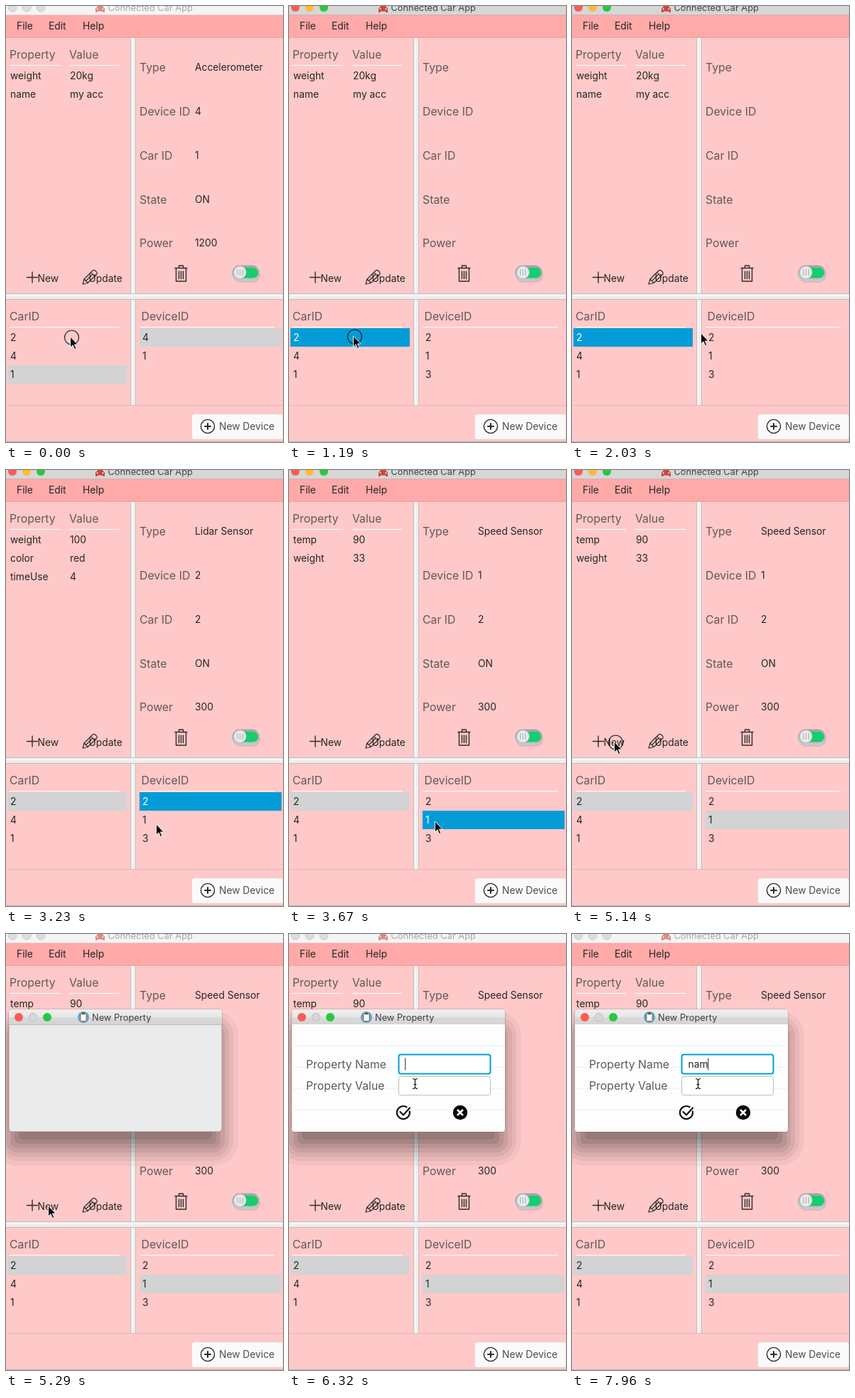
Animation, 390 px wide and 613 px high, one loop 8000 ms. Source, as an HTML page:

```html
<!DOCTYPE html>
<html lang="en">
<head>
<meta charset="utf-8">
<title>Connected Car App</title>
<style>
html, body { margin: 0; width: 100%; height: 100%; overflow: hidden; background: #ffc9c9; }
svg { display: block; }
text { font: 13.8px Inter, Roboto, sans-serif; fill: #262424; white-space: pre; }
.label { font-size: 15.8px; fill: #625858; }
.title { font-size: 12.8px; }
.icon { fill: none; stroke: #302b2b; stroke-width: 1.4; stroke-linejoin: round; stroke-linecap: round; }
</style>
</head>
<body>
<svg id="stage" width="390" height="613" viewBox="0 0 390 613">
  <defs>
    <linearGradient id="chrome" x2="0" y2="1">
      <stop offset="0" stop-color="#efefef"/><stop offset=".5" stop-color="#e6e6e6"/>
      <stop offset=".5" stop-color="#dadada"/><stop offset="1" stop-color="#d4d4d4"/>
    </linearGradient>
    <linearGradient id="pill" x2="0" y2="1">
      <stop offset="0" stop-color="#9da3a7"/><stop offset="1" stop-color="#c9cacd"/>
    </linearGradient>
  </defs>
  <g id="bar"></g>
  <path fill="#ffa9a9" d="M0 13H390V44H0z"/>
  <path stroke="#e0a8a8" d="M0 44.5H390"/>
  <text x="15" y="33">File</text><text x="60" y="33">Edit</text><text x="108" y="33">Help</text>

  <!-- split panes -->
  <path fill="#eeeeee" d="M176 45h7V561h-7zM0 404H390v9H0z"/>
  <path stroke="#c8bcbc" fill="none" d="M175.5 45V404M182.5 45V404M175.5 413V561M182.5 413V561M0 404.5H390M0 412.5H390"/>
  <path stroke="#fff" fill="none" d="M178 45V404M178 413V561M0 407H390M5 83.5H76M89 83.5H160M5 451.5H160M188 451.5H378"/>
  <path stroke="#e8b4b4" d="M0 561.5H390"/>
  <path stroke="#c9b3b3" d="M0 612.5H390"/>
  <text class="label" x="5" y="74">Property</text><text class="label" x="89" y="74">Value</text>
  <text class="label" x="5" y="442">CarID</text><text class="label" x="190.500" y="442">DeviceID</text>
  <text class="label" x="188" y="92">Type</text><text class="label" x="188" y="154">Device ID</text>
  <text class="label" x="188" y="216">Car ID</text><text class="label" x="188" y="278">State</text>
  <text class="label" x="188" y="339">Power</text>

  <!-- buttons -->
  <path class="icon" d="M29.500 381.500H44.500M37 374V389"/>
  <text x="44.500" y="388">New</text>
  <path class="icon" style="stroke-width:1.200" d="M108 391l2-7 12-12q2-1.500 4 .5l1.500 1.500q1.500 2 0 3.500l-12.500 12zM110 384l5 5M119.500 374.500l5.500 5.500M112.500 386.500l9.500-9.500"/>
  <text x="116.500" y="388">Update</text>
  <path class="icon" d="M238 368.500H255M243.500 368V365H249.500V368M239.500 369V387H253.500V369M243.500 373V383.500M246.500 373V383.500M249.500 373V383.500"/>
  <rect x="319" y="367" width="39" height="22" rx="11" fill="#000" opacity=".1"/>
  <rect x="318" y="364.500" width="39" height="22.500" rx="11.250" fill="url(#pill)"/>
  <rect x="322" y="368" width="33" height="14.500" rx="7.250" fill="#16cc6c"/>
  <circle cx="329.500" cy="374.500" r="8.700" fill="#e9eaec" stroke="#c0c3c6" stroke-width=".7"/>
  <path stroke="#b2b5ba" stroke-width="1.200" d="M326 370V379M329.500 370V379M333 370V379"/>
  <rect x="262" y="574" width="127.500" height="35" rx="3" fill="#fafafa"/>
  <circle class="icon" cx="284" cy="591" r="9.600"/>
  <path class="icon" style="stroke-width:2" d="M280 591H288M284 587V595"/>
  <text x="300" y="596" style="fill:#504b4b">New Device</text>

  <g id="data"></g>
  <g id="dialog"></g>
  <g id="pointer"></g>
</svg>
<script>
const $ = id => document.getElementById(id);
const LOOP = 8000, BLUE = '#039cd7', GREY = '#d3d3d3';

// Held pointer positions: time, x, y
const path = [
  [0, 90, 465], [440, 90, 464], [1630, 101, 463], [1770, 136, 461], [1910, 181, 460],
  [2050, 208, 463], [2190, 211, 464], [3230, 211, 498], [3380, 211, 497], [3670, 205, 494],
  [3820, 185, 483], [3970, 152, 455], [4110, 126, 415], [4260, 113, 391], [4400, 104, 388],
  [4550, 85, 385], [4700, 66, 383], [4840, 59, 382], [5730, 95, 330], [5870, 150, 250], [6020, 177, 210]
];
const clicks = [[0, 150], [1190, 1330], [2190, 2330], [3380, 3520], [5140, 5290]];

// What the panes show from each time on
const views = [
  { at: 0, car: 2, carFill: GREY, devices: [4, 1], dev: 0, devFill: GREY,
    props: [['weight', '20kg'], ['name', 'my acc']], detail: ['Accelerometer', 4, 1, 'ON', 1200] },
  { at: 1190, car: 0, carFill: BLUE, devices: [2, 1, 3], dev: -1, detail: [] },
  { at: 2190, carFill: GREY, dev: 0, devFill: BLUE,
    props: [['weight', 100], ['color', 'red'], ['timeUse', 4]], detail: ['Lidar Sensor', 2, 2, 'ON', 300] },
  { at: 3380, dev: 1, props: [['temp', 90], ['weight', 33]], detail: ['Speed Sensor', 1, 2, 'ON', 300] },
  { at: 5140, devFill: GREY }
];

const during = (t, [from, to]) => t >= from && t < to;
const text = (x, y, s, cls = '', fill = '') =>
  `<text x="${x}" y="${y}" class="${cls}"${fill && ` style="fill:${fill}"`}>${s}</text>`;
const dot = (x, y, r, fill, stroke = 'none') =>
  `<circle cx="${x}" cy="${y}" r="${r}" fill="${fill}" stroke="${stroke}"/>`;
const box = (x, y, w, h, fill, extra = '') =>
  `<rect x="${x}" y="${y}" width="${w}" height="${h}" fill="${fill}" ${extra}/>`;

function titleBar(active) {
  const lights = active ? ['#fc5b57', '#fdbc2e', '#28c83f'] : Array(3).fill('#dcdcdc');
  return box(0, 0, 390, 12, active ? '#d6d6d6' : '#f5f5f5') +
    box(0, 12, 390, 1, active ? '#cdb4b4' : '#e6cfcf') +
    lights.map((c, i) => dot(9 + 20 * i, 2, 6, c, active ? 'none' : '#c8c8c8')).join('') +
    `<g opacity="${active ? 1 : .6}"><path fill="#c9473c" d="M126 9V3l2-1 1.500-4h6l1.500 4 2 1v6h-2.500V7.500h-8V9z"/>
     <path fill="#fff" d="M127.500 3.500h2v1.500h-2zM135.500 3.500h2v1.500h-2z"/></g>` +
    text(143.5, 7, 'Connected Car App', 'title', active ? '#464646' : '#a8a8a8');
}

function list(x, w, items, chosen, fill) {
  return items.map((s, i) => {
    const on = i === chosen;
    return (on ? box(x, 453 + 26 * i, w, 26, fill) : '') +
      text(x + 4, 471 + 26 * i, s, '', on && fill === BLUE ? '#fff' : '');
  }).join('');
}

function panes(v) {
  return list(2, 168, [2, 4, 1], v.car, v.carFill) +
    list(188, 200, v.devices, v.dev, v.devFill) +
    v.props.map(([k, s], i) => text(6, 103 + 26 * i, k) + text(90, 103 + 26 * i, s)).join('') +
    v.detail.map((s, i) => text(266, Math.round(91 + 61.85 * i), s)).join('');
}

function form(t) {
  const typed = 'nam'.slice(0, [7210, 7360, 7960].filter(k => t >= k).length);
  const caret = 163.8 + [0, 8.3, 15.9, 28][typed.length];
  const caretOn = t < 5870 || during(t, [6320, 6910]) || t >= 7210;
  return box(4, 127, 300, 147, '#fdfdfd') + box(4, 260, 300, 18, '#fdfdfd', 'rx="4"') +
    '<path stroke="#e6f2f9" d="M4 157.500H304M4 187.500H304M4 217.500H304M4 247.500H304"/>' +
    text(24, 189, 'Property Name', 'label') + text(24, 219, 'Property Value', 'label') +
    box(154.5, 169.5, 129, 27, '#fff', 'rx="3" stroke="#049fd4" stroke-width="2"') +
    box(154.5, 200.5, 129, 26, '#fff', 'rx="3" stroke="#bcbcbc"') +
    text(163.5, 188, typed) +
    (caretOn ? `<path stroke="#222" d="M${caret} 174.500V191.500"/>` : '') +
    `<path class="icon" style="stroke:#111;stroke-width:2.200"
      d="M165.500 243.300A9 9 0 1 0 169.800 249.500M156.500 250l4.500 4.500 9-10"/>` +
    dot(241, 251, 10.2, '#0a0a0a') +
    '<path stroke="#fff" stroke-width="2.600" d="M237 247l8 8M245 247l-8 8"/>';
}

function dialog(t) {
  if (t < 5290) return '';
  const shadow = [23, 16, 10, 4, -2, -8, -14].map((e, i) =>
    box(4 - e, 131 - e, 300 + 2 * e, 172 + 2 * e, '#000',
      `rx="${Math.max(6, 12 + e)}" opacity="${.045 + .009 * i}"`)).join('');
  return shadow +
    box(4, 106, 300, 172, '#ebebeb', 'rx="4" stroke="#8d7c7c" stroke-width=".7"') +
    '<path fill="url(#chrome)" d="M4 127V110q0-4 4-4H300q4 0 4 4V127z"/><path stroke="#bdbdbd" d="M4 127.500H304"/>' +
    dot(18, 117, 6, '#fc5b57') + dot(38, 117, 5.7, '#d6d6d6', '#c2c2c2') + dot(58, 117, 6, '#28c83f') +
    dot(109, 117, 8, '#5aa5cf') + box(105, 112, 8, 10.5, '#fff', 'rx="1" stroke="#a8683c"') +
    box(107, 110.7, 4, 2.5, '#555') +
    text(121, 122, 'New Property', 'title', '#3f3f3f') +
    (t >= 5440 ? form(t) : '');
}

function pointer(t) {
  const [, x, y] = path.filter(p => p[0] <= t).pop();
  if (t >= 6020)
    return '<path fill="none" stroke="#111" stroke-width="1.200" d="M174 203.500q3.500 0 3.500 2.500V215q0 2.500-3.500 2.500M181 203.500q-3.500 0-3.500 2.500V215q0 2.500 3.500 2.500M175.500 211.500h4"/>';
  const ring = clicks.some(c => during(t, c))
    ? `<circle cx="${x + 2.5}" cy="${y + 1}" r="10" fill="none" stroke="#111" stroke-width="1.100"/>` : '';
  return ring + `<path transform="translate(${x + .5} ${y})" fill="#0b0b0b" stroke="#fff" stroke-width=".9"
    d="M0 0V15l3.500-3.200L6 17.500l2.400-1-2.500-5.500h4.700z"/>`;
}

function put(id, markup) {
  const el = $(id);
  if (el.markup !== markup) el.innerHTML = el.markup = markup;
}

function draw(now) {
  const t = (now - start + LOOP) % LOOP;
  put('bar', titleBar(during(t, [1190, 5290])));
  put('data', panes(Object.assign({}, ...views.filter(v => v.at <= t))));
  put('dialog', dialog(t));
  put('pointer', pointer(t));
  requestAnimationFrame(draw);
}
const start = performance.now();
draw(start);
</script>
</body>
</html>
```
